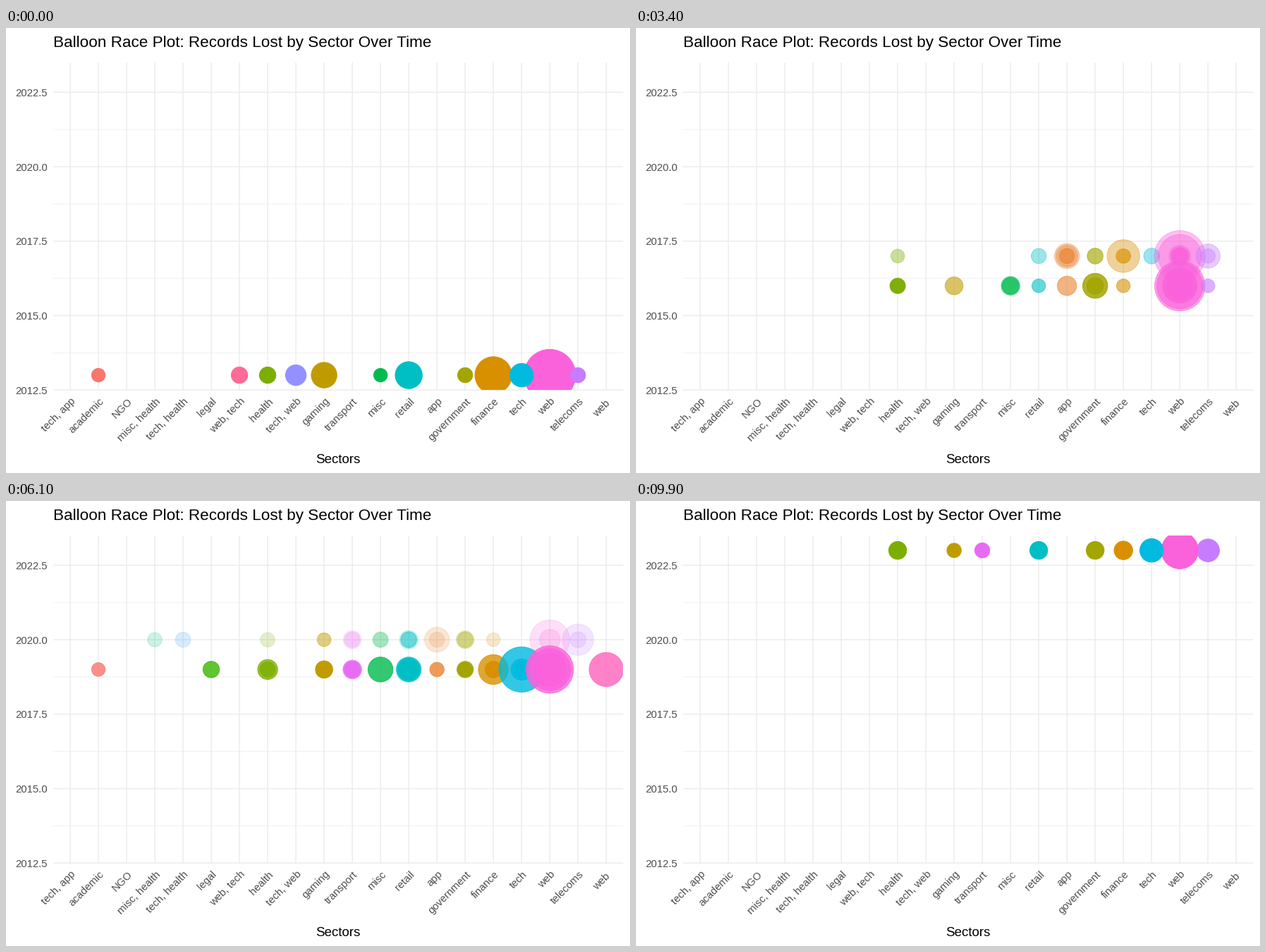
Recreate the animation shown at these times as a matplotlib script. Size 885 by 632 pixels, loop 10 s.

```python
import matplotlib.pyplot as plt
from matplotlib.animation import FuncAnimation
from matplotlib.patches import Circle, Rectangle

W, H, DPI = 885, 632, 64
FRAMES, INTERVAL = 100, 100
PX = 72 / DPI  # points per pixel
LEFT, RIGHT, TOP, BOTTOM = 67.0, 875.3, 49.0, 514.2
STEP = (RIGHT - LEFT) / 20.2

# Axis order; "web " (with a trailing space) is a category of its own.
SECTORS = ["tech, app", "academic", "NGO", "misc, health", "tech, health",
           "legal", "web, tech", "health", "tech, web", "gaming", "transport",
           "misc", "retail", "app", "government", "finance", "tech", "web",
           "telecoms", "web "]

COLORS = {
    "academic": "#F8766D", "app": "#EA8331", "finance": "#D89000",
    "gaming": "#C09B00", "government": "#A3A500", "health": "#7CAE00",
    "legal": "#39B600", "misc": "#00BB4E", "misc, health": "#00BF7D",
    "NGO": "#00C1A3", "retail": "#00BFC4", "tech": "#00BAE0",
    "tech, app": "#00B0F6", "tech, health": "#35A2FF",
    "tech, web": "#9590FF", "telecoms": "#C77CFF", "transport": "#E76BF3",
    "web": "#FA62DB", "web ": "#FF62BC", "web, tech": "#FF6A98",
}

# Balloon radii in pixels, in drawing order; "12*3" means three of radius 12.
BALLOONS = {
    2013: "academic:10.5; web, tech:12.5; health:12.5; tech, web:15.5;"
          "gaming:19; misc:10.5; retail:20; government:11.5; finance:27 11;"
          "web:37.5 18 11; tech:17.5; telecoms:11.5",
    2014: "health:11.5; transport:10; misc:10; retail:19 11; app:11;"
          "government:10; finance:21 14.5 10; web:24.5 11.5 10.5; telecoms:13",
    2015: "tech, app:10.5; health:21 13.5 11; transport:10.5; app:10.5*2;"
          "government:15.5 12.5 11; finance:10.5; web:27 20.5;"
          "telecoms:14.5 12 11",
    2016: "health:12 11*3; gaming:13.5; misc:14 12.5; retail:10.5; app:14.5;"
          "government:18.5*2 12.5*2; finance:10.5;"
          "web:36.5 33.5 25.5 24 20*2 17*2 13.5*4 11.5*4; telecoms:10.5",
    2017: "health:10.5; retail:11.5; app:18.5 16 11.5*2; government:12*2;"
          "finance:24 11*2; tech:12; web:37 31.5 16 14 12*3; telecoms:18 11",
    2018: "health:12*2; transport:21.5 11; retail:33.5 17.5; app:24.5 12;"
          "finance:14 12; government:38.5; web:26.5 21; tech:31.5 27 17;"
          "telecoms:16.5 14",
    2019: "academic:10.5; legal:12.5; health:15 11.5; gaming:13*2 12*2;"
          "transport:14 12*2; misc:18.5; retail:18.5 16.5*2 12; app:11;"
          "government:12.5 11*2; finance:22 12.5*2; tech:33 16 12;"
          "web:34.5 30.5 24 17 16 14.5*4 12*6; web :25",
    2020: "misc, health:11; tech, health:11.5; health:11; gaming:10.5*3;"
          "transport:13.5 11.5; misc:12 11; retail:14 12*3; app:18.5 11.5;"
          "government:13.5 12*2; finance:10.5; web:29 15.5; telecoms:23 12",
    2021: "gaming:13.5; transport:15 13*2; misc:11; retail:14 12.5 11.5*2;"
          "app:11.5; government:21.5 14 11; finance:27.5 12.5 11;"
          "tech:37.5 15 13*2 12*3; web:14 11*2; telecoms:36.5 20 17.5; web :41.5",
    2022: "NGO:11; transport:16.5 14; retail:17.5*2; government:29.5 10.5;"
          "finance:36.5 11.5; tech:10.5*2; telecoms:47 13.5; web:17 13.5;"
          "web :26.5 13",
    2023: "health:13.5; gaming:11; transport:11.5; retail:13.5;"
          "government:13.5; finance:14; telecoms:17; web:27; tech:17.5",
}
# Frame on which each year is fully shown.
KEYS = {year: int(9.9 * (year - 2013) + 0.4) for year in BALLOONS}

plt.rcParams["font.family"] = "Liberation Sans"


def x_at(i):
    return LEFT + STEP * (i + 0.6)


def y_at(year):
    return BOTTOM - (year - 2012.5) * (BOTTOM - TOP) / 11


def label(x, y, text, size, color="black", **kw):
    ax.text(x, y, text, fontsize=size * PX, color=color, va="baseline", **kw)


def grid(xs, ys, width):
    ax.plot(xs, ys, color="#EBEBEB", lw=width * PX, snap=False,
            solid_capstyle="butt", zorder=1, clip_path=panel)


def parse(spec):
    for part in spec.split(";"):
        name, radii = part.lstrip().split(":")
        for token in radii.split():
            r, _, n = token.partition("*")
            for _ in range(int(n or 1)):
                yield name, float(r)


fig = plt.figure(figsize=(W / DPI, H / DPI), dpi=DPI, facecolor="white")
ax = fig.add_axes([0, 0, 1, 1])
ax.axis("off")
panel = Rectangle((LEFT, TOP), RIGHT - LEFT, BOTTOM - TOP, fill=False, lw=0)
ax.add_patch(panel)

for k in range(4):
    y = y_at(2013.75 + 2.5 * k)
    grid([LEFT, RIGHT], [y, y], 0.7)
for k in range(5):
    year = 2012.5 + 2.5 * k
    y = y_at(year)
    grid([LEFT, RIGHT], [y, y], 1.4)
    label(58.7, y + 5.7, f"{year:.1f}", 14.93, "#4D4D4D", ha="right")
for i, name in enumerate(SECTORS):
    x = x_at(i)
    grid([x, x], [TOP, BOTTOM], 1.4)
    shift = 2.9 if name.endswith(" ") else 0
    label(x + 8.4 - shift, 530.8 + shift, name.strip(), 14.93, "#4D4D4D",
          ha="right", rotation=45, rotation_mode="anchor")

label(67, 27, "Balloon Race Plot: Records Lost by Sector Over Time", 22.47)
label((LEFT + RIGHT) / 2, 618, "Sectors", 18.8, ha="center")

balloons = {}
for year, spec in BALLOONS.items():
    balloons[year] = []
    for name, r in parse(spec):
        spot = Circle((x_at(SECTORS.index(name)), y_at(year)), r - 0.8,
                      color=COLORS[name], lw=0.94 * PX, zorder=3)
        ax.add_patch(spot)
        spot.set_clip_path(panel)
        balloons[year].append(spot)

ax.set_xlim(0, W)
ax.set_ylim(H, 0)


def fade(frame, year):
    """Linear fade in from the previous key and out to the next one."""
    key = KEYS[year]
    other = KEYS.get(year - 1 if frame < key else year + 1)
    if other is None:
        return float(frame == key)
    return max(0.0, 1 - (frame - key) / (other - key))


def update(frame):
    for year, spots in balloons.items():
        alpha = fade(frame, year)
        for spot in spots:
            spot.set_visible(alpha > 0)
            spot.set_alpha(alpha)
    return []


anim = FuncAnimation(fig, update, frames=FRAMES, interval=INTERVAL,
                     repeat=True, repeat_delay=0, blit=False)
plt.show()
```
